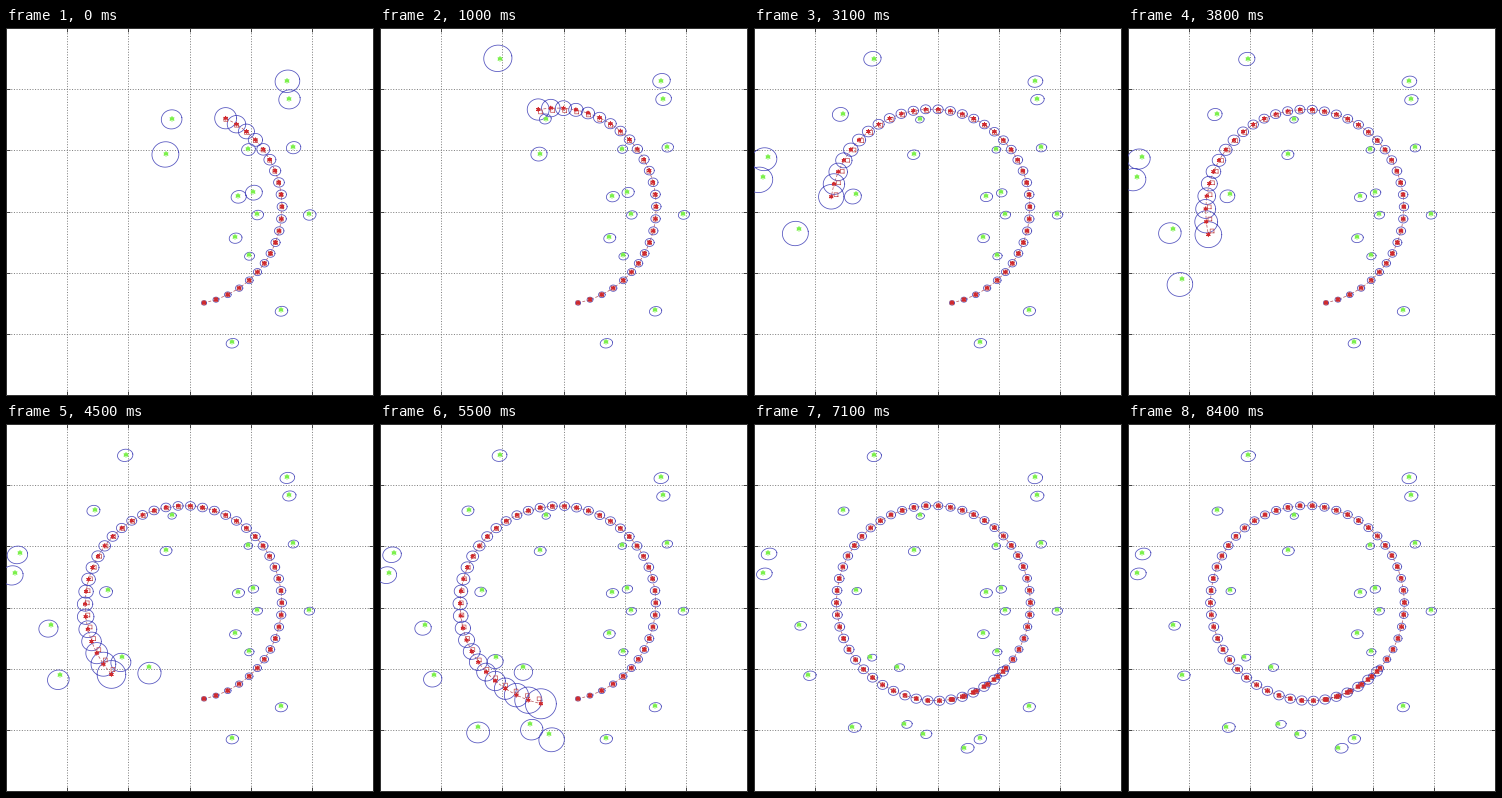
These frames come from a looping animation (368x368 px, 8800 ms). A matplotlib script:

```python
import numpy as np
import matplotlib.pyplot as plt
from matplotlib.animation import FuncAnimation

SIZE, DPI, STEP_MS, LOOP_MS = 368, 100, 50, 8800
PX = 72 / DPI                       # points per pixel
FIRST, LAST, CLOSURE = 20, 55, 50   # newest pose: at start, at end, loop closing
RED, BLUE, GREEN = "#d02a2e", "#5656c0", "#7cf04c"

# Positions are complex numbers x + iy, with y pointing down.
CENTER, RADIUS = 178.5 + 179.5j, 97.3
CORRECTION = 3.5 - 1j               # final shift of the part mapped last

# The map, in order of sighting
STARS = np.array([
    226 + 314j, 275 + 282j, 243 + 227j, 229 + 209j, 251 + 186j, 303 + 186j, 232 + 168j,
    287 + 119j, 242 + 121j, 247 + 164j, 283 + 71j, 281 + 53j, 166 + 91j, 160 + 126j,
    120 + 31j, 89 + 86j, 102 + 166j, 14 + 129j, 9 + 149j, 45 + 201j, 54 + 251j,
    116 + 233j, 143 + 243j, 98 + 303j, 150 + 300j, 169 + 310j, 210 + 324j,
])
order = np.arange(len(STARS))
BIRTHS = np.where(order < 14, 20 * np.sqrt(order / 13), 24.5 + 2 * (order - 14))
LATENESS = np.clip((BIRTHS - 25) / 25, 0, 1)
WIDTHS = 7.5 + 0.11 * np.abs(np.abs(STARS - CENTER) - RADIUS)

index = np.arange(LAST + 1)
bearing = -78.5 + 7.17 * index + 1.4 * np.exp(-((index - 4) / 2) ** 2)
TRUTH = CENTER + RADIUS * np.exp(-1j * np.radians(bearing))


def newest_pose(ms):
    """One pose every 200 ms with a single longer pause."""
    pause = 100 if ms > 3100 else 0
    return min(FIRST + (ms - pause) // 200, LAST)


def drift(k):
    return min(1 + 0.35 * (k - FIRST), 4.5) if k < CLOSURE else 0.6


def settled(k):
    """Share of the final correction applied after the loop closes."""
    return np.clip((k - CLOSURE - 1) / 3, 0, 1)


def displaced(points, amount):
    """Move points outward from the circle and a little ahead along it."""
    out = (points - CENTER) / np.abs(points - CENTER)
    return points + amount * out * (1 - 0.6j)


def stamp(centers, shape):
    """Repeat a shape at every centre as one NaN-separated polyline."""
    z = centers[:, None] + shape
    z = np.column_stack([z, np.full(len(z), np.nan)]).ravel()
    return z.real, z.imag


def ellipses(centers, widths, heights, tilt=0):
    a = np.linspace(0, 2 * np.pi, 49)
    shape = widths[:, None] * np.cos(a) + 1j * heights[:, None] * np.sin(a)
    return stamp(centers, shape / 2 * np.exp(1j * np.radians(tilt)))


def asterisk(radius):
    """Three strokes, each passing through the middle."""
    tips = radius * np.exp(1j * np.pi * (np.arange(6) / 3 + 0.5))
    return np.column_stack([tips, np.zeros(6)]).ravel()


def poses(k):
    i = index[:k + 1]
    age = k - i
    is_open = k < CLOSURE
    growth = 4.5 * np.clip((i - 28) / 19, 0, 1)
    radius = 5 - 2.5 * np.exp(-i / 5)
    if is_open:
        radius = radius + growth + 6 * np.exp(-age / 3)
    else:
        radius = radius + 0.15 * growth - 0.4 * settled(k)
    amount = drift(k) * (np.exp(-age / 8) if is_open else 1)
    pull = np.interp(i, [25, 46, 52], [0, 1, 0])
    estimate = displaced(TRUTH[i], amount) + settled(k) * pull * CORRECTION
    flatness = np.interp(radius, [5, 11], [0.87, 0.97])
    return estimate, 2 * radius, 2 * radius * flatness


def landmarks(k):
    seen = BIRTHS <= k
    birth, star = BIRTHS[seen], STARS[seen]
    fade = np.exp((birth - k) / np.interp(birth, [20, 32], [4, 11])) * (k < CLOSURE)
    width = WIDTHS[seen] + 15 * fade
    height = width * (0.74 + 0.2 * np.sqrt(fade))
    center = displaced(star, drift(k) * np.sqrt(fade)) + 0.3 + 1.2j
    center = center + settled(k) * LATENESS[seen] * CORRECTION
    return star, center, width, height


fig = plt.figure(figsize=(SIZE / 100, SIZE / 100), dpi=DPI, facecolor="white")
ax = fig.add_axes([0, 0, 1, 1])
ax.set(xlim=(0, SIZE), ylim=(SIZE, 0))
ax.axis("off")


def stroke(color, width, x=(), y=(), **style):
    line, = ax.plot(x, y, color=color, lw=width * PX, snap=False, **style)
    return line


for g in np.floor(np.arange(1, 6) * SIZE / 6) + 0.5:
    for start, end, color, style in ((0, SIZE, "#666666", (0, (1.3, 2))),
                                     (0, 4, "#222222", "-"),
                                     (SIZE - 4, SIZE, "#222222", "-")):
        stroke(color, 0.8, (g, g), (start, end), ls=style)
        stroke(color, 0.8, (start, end), (g, g), ls=style)
edge = SIZE - 0.5
stroke("#333333", 1, [0.5, edge, edge, 0.5, 0.5], [0.5, 0.5, edge, edge, 0.5])

path = stroke("#b05058", 0.7, ls=(0, (4, 2.5)))
rings = stroke(BLUE, 0.8)
pose_rings = stroke(BLUE, 0.8)
squares = stroke("#c04c50", 0.7)
dots = stroke(RED, 0.9)
stars = stroke(GREEN, 0.9)
artists = [path, rings, pose_rings, squares, dots, stars]

SQUARE = 1.9 * np.array([1 + 1j, -1 + 1j, -1 - 1j, 1 - 1j, 1 + 1j])


def update(frame):
    k = newest_pose(frame * STEP_MS)
    estimate, *axes = poses(k)
    path.set_data(estimate.real, estimate.imag)
    pose_rings.set_data(*ellipses(estimate, *axes))
    dots.set_data(*stamp(estimate, asterisk(1.9)))
    true_pose = TRUTH[:k + 1] if k < CLOSURE else estimate
    squares.set_data(*stamp(true_pose, SQUARE))
    star, *shapes = landmarks(k)
    stars.set_data(*stamp(star, asterisk(2.2)))
    rings.set_data(*ellipses(*shapes, tilt=-10))
    return artists


anim = FuncAnimation(fig, update, frames=LOOP_MS // STEP_MS, interval=STEP_MS,
                     repeat=True, repeat_delay=0, blit=False)
plt.show()
```
